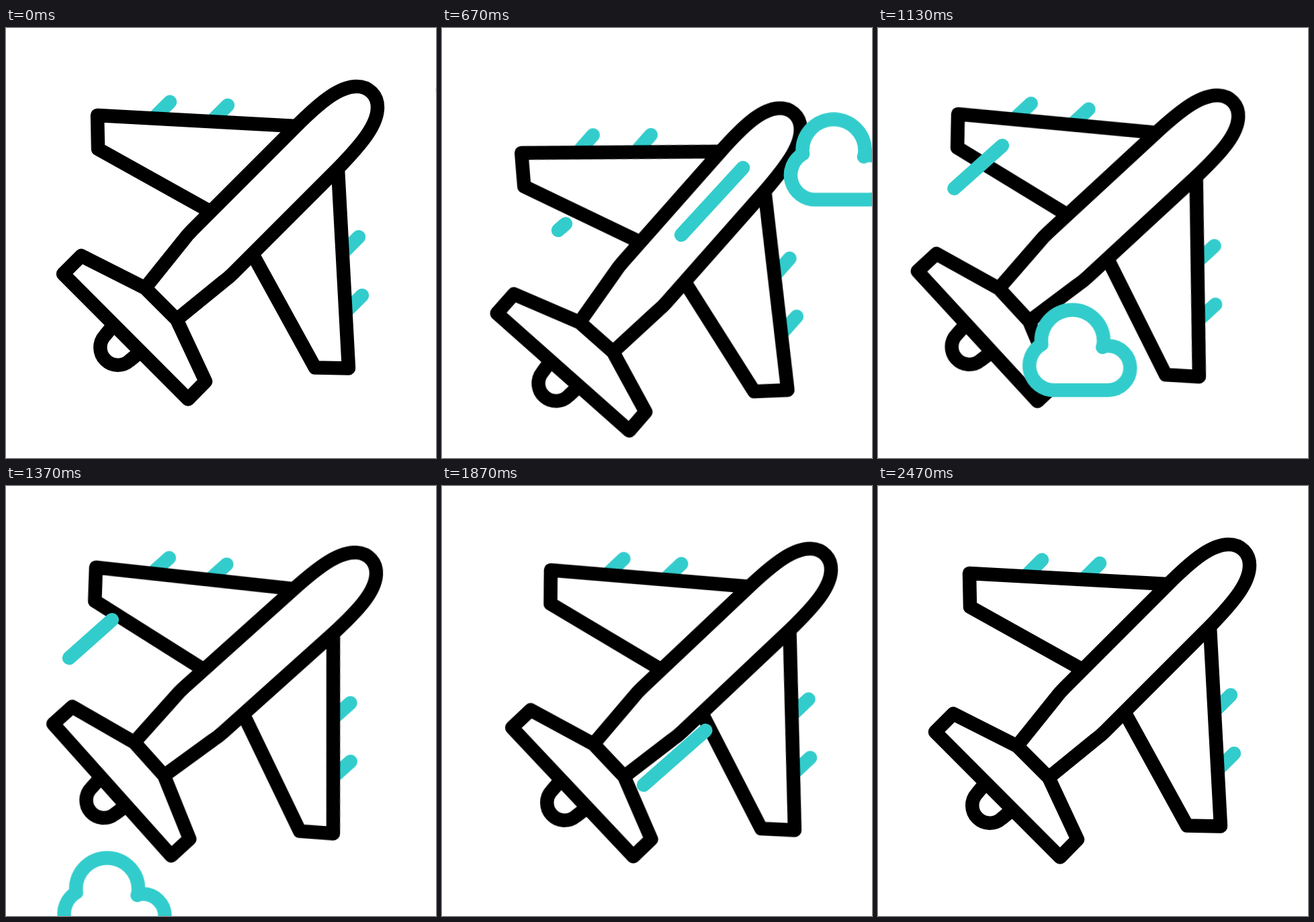
Write an HTML page without scripts that moves like this. It is 640 px wide and 640 px high and loops after 2500 ms.

```html
<!DOCTYPE html>
<html lang="en">
<head>
<meta charset="utf-8">
<title>Plane in flight</title>
<style>
  html, body { margin: 0; width: 100%; height: 100%; overflow: hidden; background: #fff; }
  svg { display: block; width: 100vw; height: 100vh; }

  path { stroke-width: 20.5; stroke-linecap: round; stroke-linejoin: round; }
  .plane path { fill: #fff; stroke: #000; }
  .teal, .plane .teal { fill: none; stroke: #3cc; }
  .cloud { fill: #fff; stroke: #3cc; }

  .sway, .dip, .tilt, .cloud, .streak {
    animation: 2500ms cubic-bezier(.333, 0, .667, 1) infinite;
  }
  .sway { animation-name: sway; }
  .dip { animation-name: dip; }
  .tilt { animation-name: tilt; transform-origin: 323px 318px; }
  .cloud { animation-name: drift; animation-timing-function: cubic-bezier(.37, 0, .63, 1); }
  .streak {
    opacity: 0;
    animation-name: streak;
    animation-delay: var(--start);
  }

  @keyframes sway {
    0%, 16% { transform: translateX(0); }
    48% { transform: translateX(-25px); }
    69% { transform: translateX(25px); }
    90.4%, 100% { transform: translateX(0); }
  }
  @keyframes dip {
    0%, 100% { transform: translateY(0); }
    25.6% { transform: translateY(44.5px); }
    50% { transform: translateY(1px); }
  }
  @keyframes tilt {
    0%, 100% { transform: rotate(0deg); }
    25% { transform: rotate(-3.6deg); }
    51.2% { transform: rotate(3.15deg); }
  }
  @keyframes drift {
    0%, 8.4% { transform: translate(290px, -280px); }
    71.2%, 100% { transform: translate(-378px, 365px); }
  }
  /* The head runs out first, then the tail catches up. */
  @keyframes streak {
    0% { opacity: 1; stroke-dasharray: 0 300; stroke-dashoffset: 0; }
    14% { opacity: 1; stroke-dasharray: 100 300; stroke-dashoffset: 0; }
    29% { opacity: 1; stroke-dasharray: 0 300; stroke-dashoffset: -100; }
    29.01%, 100% { opacity: 0; stroke-dasharray: 0 300; stroke-dashoffset: -100; }
  }
</style>
</head>
<body>
<svg viewBox="0 0 640 640">
  <g class="sway"><g class="dip"><g class="tilt plane">
    <path class="teal" d="M244 110l-20 20M330 115l-20 20M525 311l-20 20M530 398l-20 20"/>
    <path d="M431 146L136 130L137 180L302 272"/>
    <path d="M494 210L510 506.5L460 505.5L370 342"/>
    <path d="M156 447L147 458A26.2 26.2 0 0 0 184 495L195 486"/>
    <path d="M207 387L264 316Q269 309 277 301L431 147C470 108 497 87 522 87C540 87 553 100 553 118C553 143 532 170 494 209L338 365Q331 372 324 377L254 434Z"/>
    <path d="M207 387L112 339L85 366L271 552.5L297 526L254 434Z"/>
  </g></g></g>

  <path class="teal streak" style="--start: 10ms" pathLength="100" d="M314 179L173 301"/>
  <path class="teal streak" style="--start: 325ms" pathLength="100" d="M448 208L356 308"/>
  <path class="teal streak" style="--start: 885ms" pathLength="100" d="M185 175L94 256"/>
  <path class="teal streak" style="--start: 1412ms" pathLength="100" d="M416 343L300 445"/>

  <path class="cloud" d="M469 345Q470.5 341 470.5 336A46.5 46.5 0 0 0 377.500 336L378 341A36.5 36.5 0 0 0 397 409H477A33 33 0 0 0 477 343Q472 343 469 345Z"/>
</svg>
</body>
</html>
```
